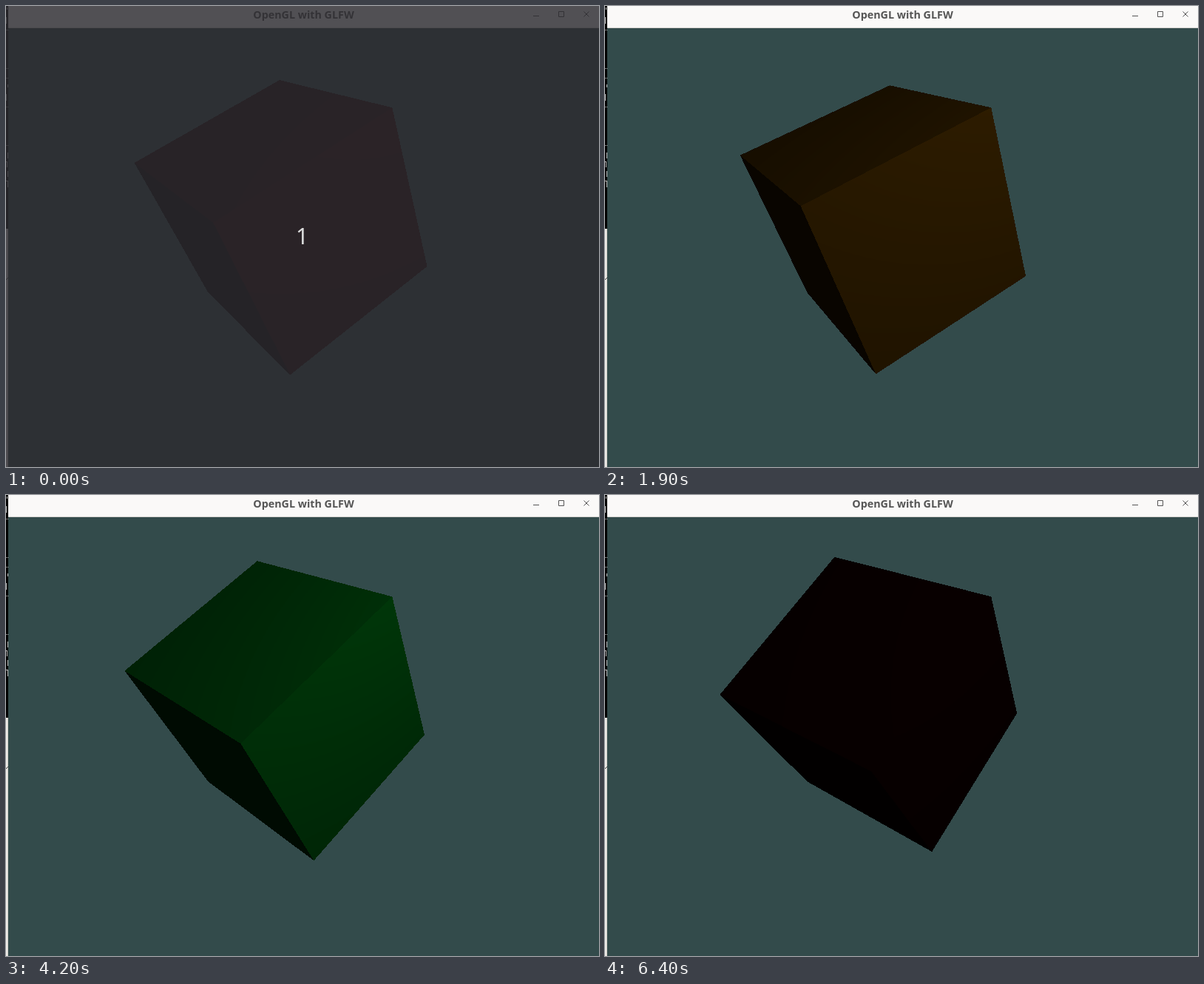
Recreate the animation shown at these times as an HTML page with a canvas. Size 802 px wide and 623 px high, loop 6600 ms.

```html
<!DOCTYPE html>
<html lang="en">
<head>
<meta charset="utf-8">
<title>OpenGL with GLFW</title>
<style>
  html, body { margin: 0; width: 100%; height: 100%; overflow: hidden; background: #334b4b; }
  canvas, svg { position: absolute; left: 0; top: 0; width: 802px; height: 623px; display: block; }
  text { font-family: "Noto Sans", "Open Sans", sans-serif; text-anchor: middle; }
  .title { font-size: 14.3px; font-weight: 700; fill: #555; }
  .count { font-size: 30px; fill: #dcdcdc; }
  .icon { fill: none; stroke: #555; stroke-width: 1; }
  .scrap { stroke: #bbb; stroke-width: 1; }
</style>
</head>
<body>
<canvas id="scene" width="802" height="623"></canvas>
<svg viewBox="0 0 802 623">
  <!-- sliver of the window behind -->
  <rect width="3" height="302" fill="#000"/>
  <rect y="301" width="3" height="322" fill="#eeece8"/>
  <rect x="2" y="301" width="1" height="322" fill="#c9c7c2"/>
  <path class="scrap" stroke-dasharray="1" d="M0 32.5h3M0 84.5h3M0 97.5h3M0 136.5h3M0 188.5h3"/>
  <path class="scrap" d="M.5 15v9M1.5 2v3M2.5 106v4M.5 119v9M2.5 198v8M0 210.5h2M1.5 210v8M2.5 223v8M0 236.5h3M2.5 236v9"/>
  <path d="M0 370l3-3" stroke="#444"/>
  <!-- title bar -->
  <rect x="3" width="799" height="30" fill="#faf9f8"/>
  <rect x="3" y="29" width="799" height="1" fill="#d5d3cf"/>
  <text class="title" x="402.5" y="17">OpenGL with GLFW</text>
  <path class="icon" d="M713 13.5h8M747.5 7.5h7v7h-7z"/>
  <path class="icon" d="M781.5 7.5l7 7m0-7l-7 7" stroke-width="1.2"/>
  <!-- recorder countdown -->
  <g id="countdown">
    <rect width="802" height="623" fill="#2c2b30" fill-opacity=".82"/>
    <text class="count" x="400.5" y="322">1</text>
  </g>
</svg>
<script>
  const LOOP = 6600, STEP = 100, LAST_STEP = 64;
  const BOX = { x: 148, y: 76, w: 430, h: 430 };
  const CENTER = { x: 402.5, y: 330 };
  const FOCAL = 300 / Math.tan(Math.PI / 8);
  const EYE = [0, 0, 3], LIGHT = [1.2, 1, 2], MATERIAL = [1, 0.5, 0.31];
  const HALF = 0.5, SHININESS = 32, CLOCK_START = 7.7;

  const ctx = document.getElementById("scene").getContext("2d");
  const countdown = document.getElementById("countdown");
  const image = ctx.createImageData(BOX.w, BOX.h);

  const radians = deg => deg * Math.PI / 180;
  const yaw = radians(2.05), pitch = radians(3.66);
  const [sy, cy, sp, cp] = [Math.sin(yaw), Math.cos(yaw), Math.sin(pitch), Math.cos(pitch)];
  const FORWARD = [sy * cp, -sp, -cy * cp];
  const RIGHT = [cy, 0, sy];
  const UP = [sy * sp, cp, -cy * sp];

  // Rotation about the cube's (1,1,1) diagonal.
  function spin([x, y, z], angle) {
    const m = (x + y + z) / 3, c = Math.cos(angle), s = Math.sin(angle) / Math.sqrt(3);
    return [
      m + (x - m) * c + (z - y) * s,
      m + (y - m) * c + (x - z) * s,
      m + (z - m) * c + (y - x) * s
    ];
  }

  // Casts one ray per pixel in the cube's own space, with Phong lighting.
  function drawCube(seconds) {
    const angle = -1.275 + seconds * Math.PI / 3;
    const [eye, light, fwd, right, up] =
      [EYE, LIGHT, FORWARD, RIGHT, UP].map(v => spin(v, -angle));
    const clock = CLOCK_START + seconds;
    const tint = [2, 0.7, 1.3].map((rate, i) => Math.sin(clock * rate) * MATERIAL[i]);
    const faces = [0, 1, 2].filter(k => Math.abs(eye[k]) > HALF);
    const data = image.data;
    data.fill(0);

    for (let j = 0, at = 0; j < BOX.h; j++) {
      const v = (CENTER.y - BOX.y - j - 0.5) / FOCAL;
      for (let i = 0; i < BOX.w; i++, at += 4) {
        const u = (BOX.x + i + 0.5 - CENTER.x) / FOCAL;
        const dx = fwd[0] + u * right[0] + v * up[0];
        const dy = fwd[1] + u * right[1] + v * up[1];
        const dz = fwd[2] + u * right[2] + v * up[2];
        for (const k of faces) {
          const side = Math.sign(eye[k]);
          const t = (side * HALF - eye[k]) / (k === 0 ? dx : k === 1 ? dy : dz);
          const px = eye[0] + t * dx, py = eye[1] + t * dy, pz = eye[2] + t * dz;
          const reach = Math.max(Math.abs(px), Math.abs(py), Math.abs(pz));
          if (t > 0 && reach <= HALF + 1e-9) {
            shade(data, at, px, py, pz, k, side, eye, light, tint);
            break;
          }
        }
      }
    }
    ctx.putImageData(image, BOX.x, BOX.y);
  }

  function shade(data, at, px, py, pz, k, side, eye, light, tint) {
    const lx = light[0] - px, ly = light[1] - py, lz = light[2] - pz;
    const vx = eye[0] - px, vy = eye[1] - py, vz = eye[2] - pz;
    const ll = Math.hypot(lx, ly, lz), vl = Math.hypot(vx, vy, vz);
    const ln = side * (k === 0 ? lx : k === 1 ? ly : lz) / ll;
    const vn = side * (k === 0 ? vx : k === 1 ? vy : vz) / vl;
    const lv = (lx * vx + ly * vy + lz * vz) / (ll * vl);
    const matte = 0.1 + 0.5 * Math.max(ln, 0);
    const gloss = 0.5 * Math.pow(Math.max(2 * ln * vn - lv, 0), SHININESS);
    for (let c = 0; c < 3; c++) data[at + c] = 255 * (tint[c] * matte + gloss);
    data[at + 3] = 255;
  }

  let shown = -1;
  function render(now) {
    const step = Math.min(LAST_STEP, Math.floor((now % LOOP) / STEP));
    if (step !== shown) {
      shown = step;
      drawCube(step * STEP / 1000);
      countdown.style.display = step === 0 ? "" : "none";
    }
  }
  function tick() {
    render(performance.now());
    requestAnimationFrame(tick);
  }
  tick();
</script>
</body>
</html>
```
